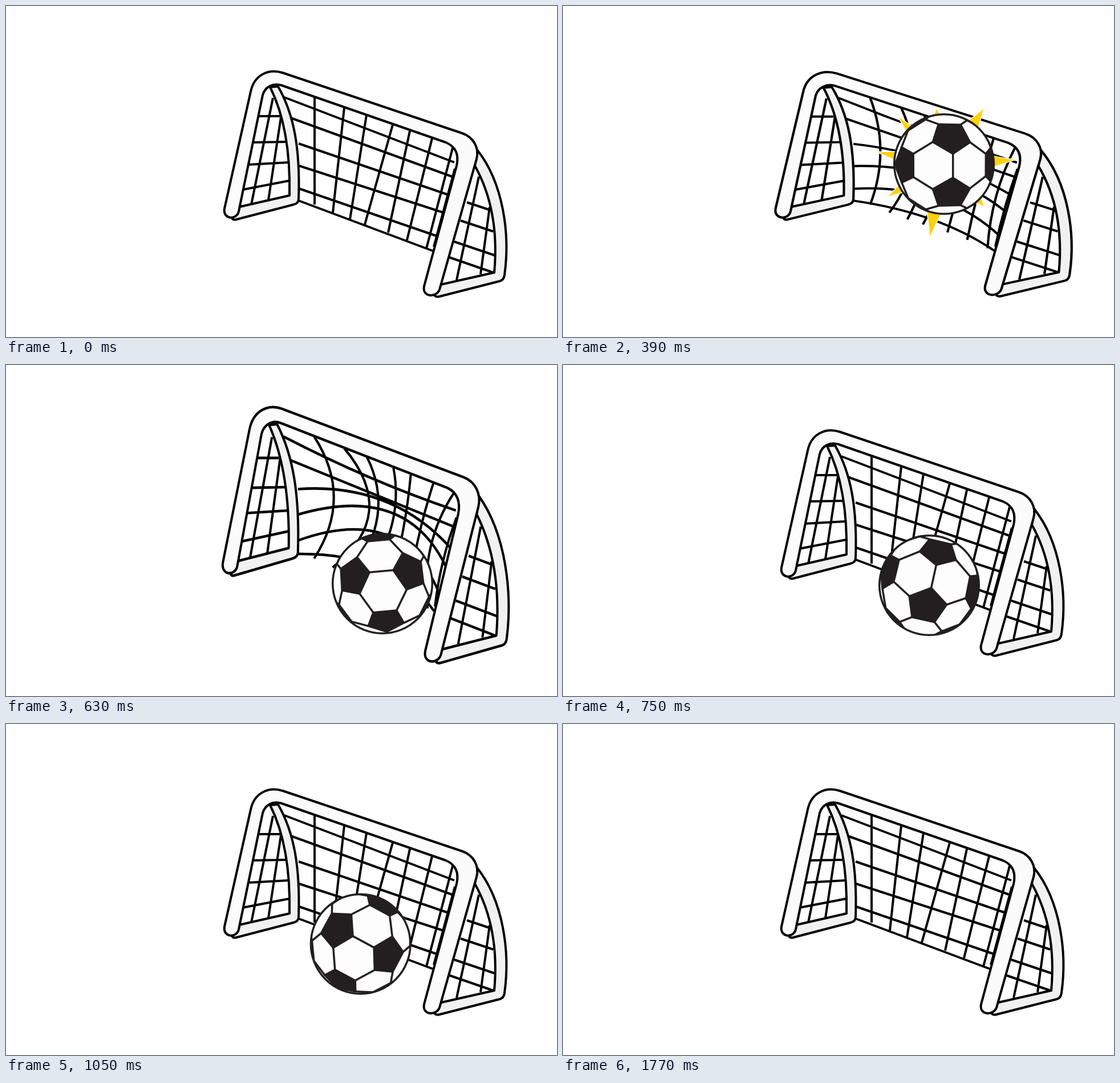
Animation of 966 by 580 pixels, one loop 1800 ms. Source, as an HTML page with a canvas:

```html
<!DOCTYPE html>
<html lang="en">
<head>
<meta charset="utf-8">
<title>Ball in the goal</title>
<style>
html, body { margin: 0; width: 100%; height: 100%; overflow: hidden; background: #fff; }
canvas { display: block; }
</style>
</head>
<body>
<canvas id="stage" width="966" height="580"></canvas>
<script>
const ctx = document.getElementById('stage').getContext('2d');
const LOOP = 1800, STEP = 30;

// Linear keyframes: each row is [time, ...values]
function sample(keys, t) {
  const i = keys.findIndex(k => k[0] > t);
  if (i === 0) return keys[0].slice(1);
  if (i < 0) return keys[keys.length - 1].slice(1);
  const a = keys[i - 1], b = keys[i], f = (t - a[0]) / (b[0] - a[0]);
  return a.slice(1).map((v, j) => v + (b[j + 1] - v) * f);
}

// time, centre x, centre y, scale x, scale y, net bulge
const goalKeys = [
  [360, 630, 311.5, 1, 1, 0],
  [420, 634, 312, 1.1, 0.99, 1],
  [450, 636, 312, 1.133, 0.99, 1],
  [510, 635, 308.5, 1.113, 1.03, 1],
  [540, 634, 303, 1.1, 1.1, 1],
  [570, 632, 293.5, 1.05, 1.18, 1],
  [630, 630.5, 297.5, 1.014, 1.136, 1],
  [750, 630, 311.5, 1, 1, 0]
];

// time, x, y, spin in degrees, offset of the middle seam
const ballKeys = [
  [30, 146, 402, -75, 21, -7],
  [240, 460, 325, -15, 21, -7],
  [390, 668, 277, 0, 16, 3],
  [540, 668, 277, 0, 16, 3],
  [570, 667, 290, -20, 13, -2],
  [600, 664, 330, -60, 5, -14],
  [630, 660, 383, -95, -2, -22],
  [690, 650, 386, -140, 4, -19],
  [870, 626, 386, -223, 16.5, -10],
  [1080, 621, 385.5, -245, 3, -3],
  [1320, 619, 385, -257, -5, 1],
  [1800, 619, 385, -260, -5, 1]
];

// x0, y0, x1, y1, bend x, bend y
const backNet = [
  [541, 160, 541, 348, 68, 0], [593, 178, 573, 362, 106, 10],
  [632, 191, 603, 374, 66, 0], [678, 208, 629, 383, 44, 0],
  [708, 219, 670, 397, 10, 0], [747, 232, 703, 410, -10, 0],
  [784, 245, 737, 425, -36, -10], [787, 285, 750, 422, -10, 0],
  [488, 160, 786, 274, 0, 12], [499, 196, 785, 300, 0, 0],
  [513, 241, 776, 331, 30, -55], [514, 280, 770, 363, 60, -90],
  [514, 320, 758, 404, 60, -100], [513, 341, 748, 429, 50, -45]
];
const sideNet = new Path2D(`M442 193H480 M433 239L492 238 M424 278L496 274 M414 322L497 306
  M468 161L430 348 M482 195L460 340 M829 299L790 480 M848 352L832 470
  M808 344L847 357 M797 376L854 395 M786 413L857 437 M776 440L857 468`);
const supports = [
  'M463 142C482 180 499 240 497 332L409 352L396 371Q398 376 404 374L504 348Q513 346 513 338C516 250 505 190 477 141Z',
  'M822 280C850 330 863 390 856 467L763 488L750 504Q752 511 760 509L866 482Q873 480 874 471C884 400 872 310 826 252Z'
].map(d => new Path2D(d));
const frame = new Path2D(`M383 355L429 150C435 121 460 109 485 117L800 223C820 230 830 249 825 268
  L760 497C754 512 729 510 733 491L790 280C794 262 790 247 771 239
  L483 139C468 134 454 142 450 156L408 360C404 376 380 374 383 355Z`);

function drawGoal(t) {
  const [cx, cy, sx, sy, bulge] = sample(goalKeys, t);
  ctx.save();
  ctx.translate(cx, cy);
  ctx.scale(sx, sy);
  ctx.translate(-630, -311.5);
  ctx.strokeStyle = '#000';
  ctx.lineWidth = 4;
  ctx.beginPath();
  for (const [x0, y0, x1, y1, bx, by] of backNet) {
    ctx.moveTo(x0, y0);
    ctx.quadraticCurveTo((x0 + x1) / 2 + bx * bulge, (y0 + y1) / 2 + by * bulge, x1, y1);
  }
  ctx.stroke();
  ctx.stroke(sideNet);
  const solid = (path, fill) => {
    ctx.fillStyle = fill;
    ctx.fill(path);
    ctx.stroke(path);
  };
  supports.forEach(p => solid(p, '#f1f1f1'));
  solid(frame, '#fbfbfb');
  ctx.restore();
}

// Spikes relative to the ball centre: tip, then the valley after it
const burst = [
  [-19, -142, 17, -88], [101, -141, 84, -37], [180, -11, 84, 33], [102, 107, 22, 88],
  [-36, 186, -63, 68], [-143, 83, -91, 15], [-171, -31, -85, -40], [-117, -122, -50, -80]
];

function drawBurst(x, y, size) {
  ctx.save();
  ctx.translate(x, y);
  ctx.scale(size, size);
  ctx.beginPath();
  let [vx, vy] = burst[burst.length - 1].slice(2);
  ctx.moveTo(vx, vy);
  for (const [tx, ty, nx, ny] of burst) {
    const k = 108 / Math.hypot(tx, ty);
    const bend = (px, py) => [(px + tx * k) / 2, (py + ty * k) / 2];
    ctx.quadraticCurveTo(...bend(vx, vy), tx, ty);
    ctx.quadraticCurveTo(...bend(nx, ny), nx, ny);
    [vx, vy] = [nx, ny];
  }
  ctx.closePath();
  ctx.fillStyle = '#ffd10a';
  ctx.strokeStyle = '#fff';
  ctx.lineWidth = 2;
  ctx.fill();
  ctx.stroke();
  ctx.restore();
}

// Truncated icosahedron: a patch on each corner, a seam on each edge
const PHI = (1 + Math.sqrt(5)) / 2;
const corners = [];
for (const a of [-1, 1]) for (const b of [-PHI, PHI])
  corners.push([0, a, b], [a, b, 0], [b, 0, a]);
const near = (a, b) => Math.abs(Math.hypot(...a.map((v, i) => v - b[i])) - 2) < 0.01;
const third = (a, b) => {
  const p = a.map((v, i) => 2 * v + b[i]), len = Math.hypot(...p);
  return p.map(v => v / len);
};
const patches = corners.map(a => corners.filter(b => near(a, b)).map(b => third(a, b)));
const seams = [];
corners.forEach((a, i) => corners.slice(i).forEach(b => {
  if (near(a, b)) seams.push([third(a, b), third(b, a)]);
}));

const R = 87.3, EYE = 5.5, FOCUS = R * Math.sqrt(EYE * EYE - 1);

function turn(u, v, angle) {
  const c = Math.cos(angle), s = Math.sin(angle);
  return [u * c - v * s, u * s + v * c];
}

function drawBall(x, y, spin, mx, my) {
  const tiltX = Math.asin(mx / 104), tiltY = Math.asin(my / 104);
  const project = ([px, py, pz]) => {
    [px, py] = turn(px, py, spin * Math.PI / 180);
    [pz, px] = turn(pz, px, tiltX);
    [pz, py] = turn(pz, py, tiltY);
    const seen = pz > 1 / EYE;
    const k = seen ? FOCUS / (EYE - pz) : R * 1.06 / Math.hypot(px, py);
    return { x: px * k, y: py * k, seen };
  };
  const trace = pts => {
    ctx.beginPath();
    pts.forEach(p => ctx.lineTo(p.x, p.y));
  };
  const visible = pts => pts.some(p => p.seen);

  ctx.save();
  ctx.translate(x, y);
  ctx.fillStyle = '#fdfdfd';
  ctx.strokeStyle = '#231f20';
  ctx.lineWidth = 3.5;
  const rim = new Path2D();
  rim.arc(0, 0, R, 0, 2 * Math.PI);
  ctx.fill(rim);
  ctx.save();
  ctx.clip(rim);
  for (const seam of seams) {
    const pts = seam.map(project);
    if (visible(pts)) { trace(pts); ctx.stroke(); }
  }
  ctx.fillStyle = '#231f20';
  for (const patch of patches) {
    const pts = patch.map(project);
    if (!visible(pts)) continue;
    const cx = pts.reduce((s, p) => s + p.x, 0) / 5;
    const cy = pts.reduce((s, p) => s + p.y, 0) / 5;
    const dir = p => Math.atan2(p.y - cy, p.x - cx);
    trace(pts.sort((p, q) => dir(p) - dir(q)));
    ctx.closePath();
    ctx.fill();
    ctx.stroke();
  }
  ctx.restore();
  ctx.stroke(rim);
  ctx.restore();
}

function draw(now) {
  const t = Math.floor(now % LOOP / STEP) * STEP;
  ctx.clearRect(0, 0, 966, 580);
  ctx.lineJoin = 'round';
  drawGoal(t);
  if (t >= 30) {
    const pose = sample(ballKeys, t);
    if (t >= 390 && t < 570) drawBurst(pose[0], pose[1], Math.min(1, 0.7 + (t - 390) / 200));
    ctx.globalAlpha = Math.max(0, Math.min(1, (1770 - t) / 150));
    drawBall(...pose);
    ctx.globalAlpha = 1;
  }
}

const start = performance.now();
function tick() {
  draw(performance.now() - start);
  requestAnimationFrame(tick);
}
tick();
</script>
</body>
</html>
```
